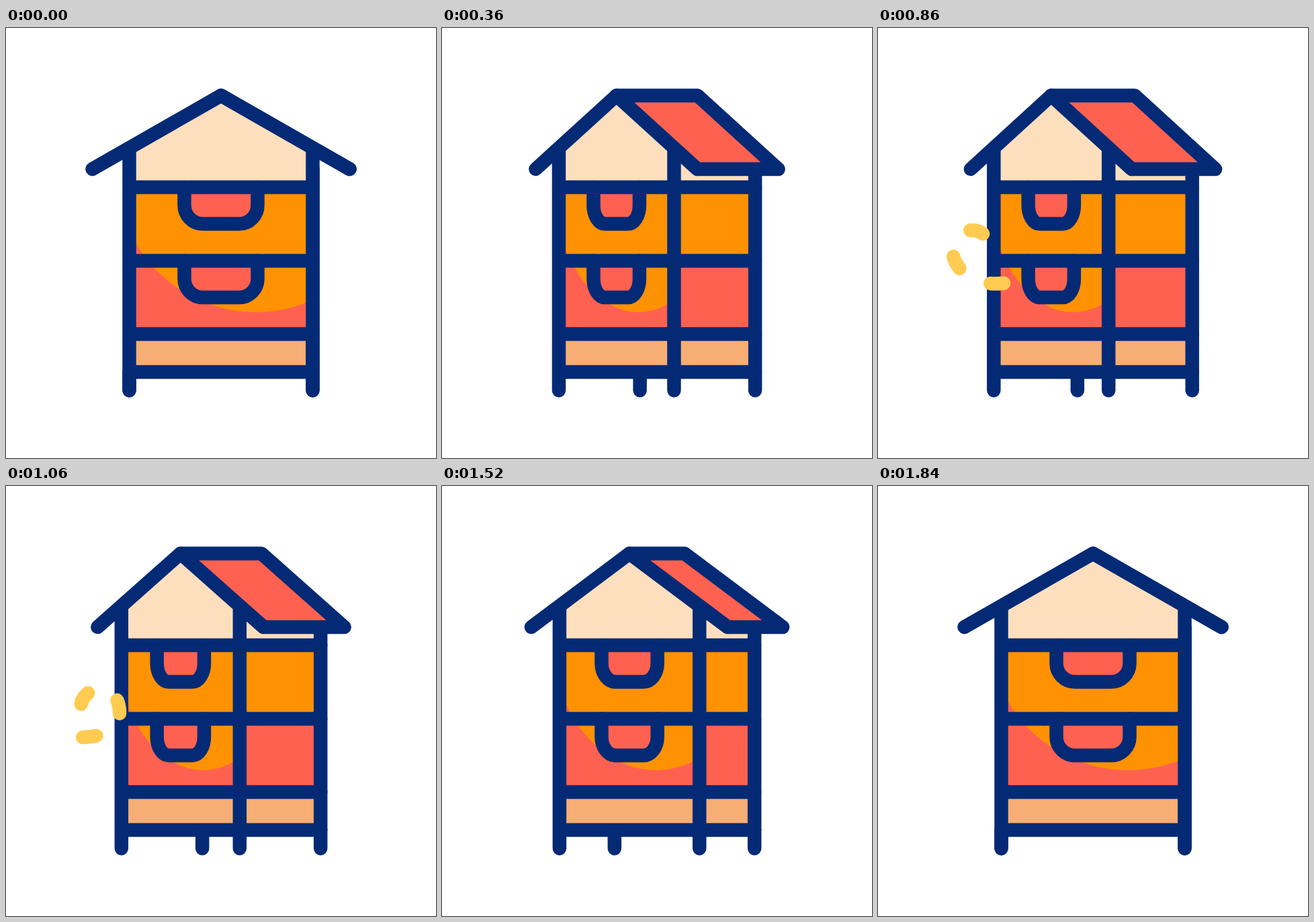
An HTML page for the animation above (2400 ms loop, 640 by 640 pixels).

```html
<!DOCTYPE html>
<html lang="en">
<head>
<meta charset="utf-8">
<title>Beehive</title>
<style>
  html, body { margin: 0; width: 100%; height: 100%; overflow: hidden; background: #fff; }
  svg { display: block; width: 100%; height: 100%; }
</style>
</head>
<body>
<svg viewBox="0 0 640 640" fill="none" stroke-width="20.5" stroke-linecap="round" stroke-linejoin="round"></svg>
<script>
const LOOP = 2400;
const NAVY = '#042a76', ORANGE = '#ff9202', CORAL = '#ff6150', PEACH = '#fddfbe', TAN = '#f6ae74', YELLOW = '#ffcb50';
const svg = document.querySelector('svg');

function shape(fill, stroke = 'none') {
  const path = document.createElementNS('http://www.w3.org/2000/svg', 'path');
  path.setAttribute('fill', fill);
  path.setAttribute('stroke', stroke);
  svg.append(path);
  return d => path.setAttribute('d', d);
}

// Painted from back to front.
const parts = {
  backLegs: shape('none', NAVY),
  gables: shape(PEACH),
  sideTop: shape(ORANGE),
  sideLow: shape(CORAL),
  base: shape(TAN),
  backPost: shape('none', NAVY),
  roof: shape(CORAL, NAVY),
  gable: shape(PEACH),
  front: shape(CORAL),
  glow: shape(ORANGE),
  handles: shape(CORAL, NAVY),
  frame: shape('none', NAVY),
  trail: shape('none', YELLOW)
};
const trail = svg.lastChild;
parts.trail('M232 372Q180 385 153 378C135 373.5 112 356 111 332C110 313 128 300 142 301' +
  'C160 302 169 320 169 337C169 360 150 372 116 374C80 374 55 358 31 340');
trail.setAttribute('stroke-dasharray', '20 52.5 20 52.5 20 5000');

// Time, shift and its slope, narrowing and its slope.
const keys = [
  [0, 0, 0, 0, 0],
  [360, 60.3, .03, 101.5, .05],
  [640, 63.5, -.004, 106, -.01],
  [1060, 60.2, -.013, 97, -.027],
  [1340, 55, -.03, 88.5, -.05],
  [1680, 17.6, -.17, 26.5, -.27],
  [1840, 0, 0, 0, 0],
  [LOOP, 0, 0, 0, 0]
];

function pose(t, col) {
  const i = keys.findIndex(key => key[0] > t);
  const a = keys[i - 1], b = keys[i], span = b[0] - a[0];
  const u = (t - a[0]) / span, v = 1 - u;
  return v * v * (1 + 2 * u) * a[col] + u * u * (3 - 2 * u) * b[col] +
    span * u * v * (v * a[col + 1] - u * b[col + 1]);
}

const rect = (x1, y1, x2, y2) => `M${x1} ${y1}H${x2}V${y2}H${x1}Z`;
const post = (x, top) => `M${x} ${top}V539.5`;

function draw(t) {
  const shift = pose(t, 1), k = 1 - pose(t, 3) / 273;
  const near = u => 320 - shift + k * u;
  const far = u => 320 + shift + k * u;
  const left = near(-136.5), right = near(136.5), back = far(136.5);

  parts.backLegs(post(far(-136.5), 512));
  parts.gables(rect(right, 178.4, back, 237));
  parts.sideTop(rect(right, 237, back, 346.5));
  parts.sideLow(rect(right, 346.5, back, 455.5));
  parts.base(rect(left, 455.5, back, 512));
  parts.backPost(post(back, 210));
  parts.roof(`M${near(0)} 100.5H${far(0)}L${far(191.5)} 210H${near(191.5)}Z`);
  parts.gable(`M${left} 237V178.4L${near(0)} 100.5L${right} 178.4V237Z`);
  parts.front(rect(left, 237, right, 455.5));
  parts.glow(`M${left} 237V301.5A${207 * k} 207 0 0 0 ${right} 405V237Z`);

  const corner = `a${27.5 * k} 27.5 0 0 0 ${27.5 * k} `;
  parts.handles([237, 346.5].map(y =>
    `M${near(-54.5)} ${y}v27${corner}27.5H${near(27)}${corner}-27.5v-27`).join(''));

  const bars = [237, 346.5, 455.5, 512].map(y => `M${left} ${y}H${back}`).join('');
  parts.frame(bars + post(left, 178.4) + post(right, 178.4) +
    `M${near(-191.5)} 210L${near(0)} 100.5L${near(191.5)} 210`);

  const head = 101 + .517 * (t - 640) + .000108 * (t - 640) * (t - 1060);
  trail.setAttribute('stroke-dashoffset', 165 - head);
}

const start = performance.now();
function tick() {
  draw((performance.now() - start) % LOOP);
  requestAnimationFrame(tick);
}
tick();
</script>
</body>
</html>
```
